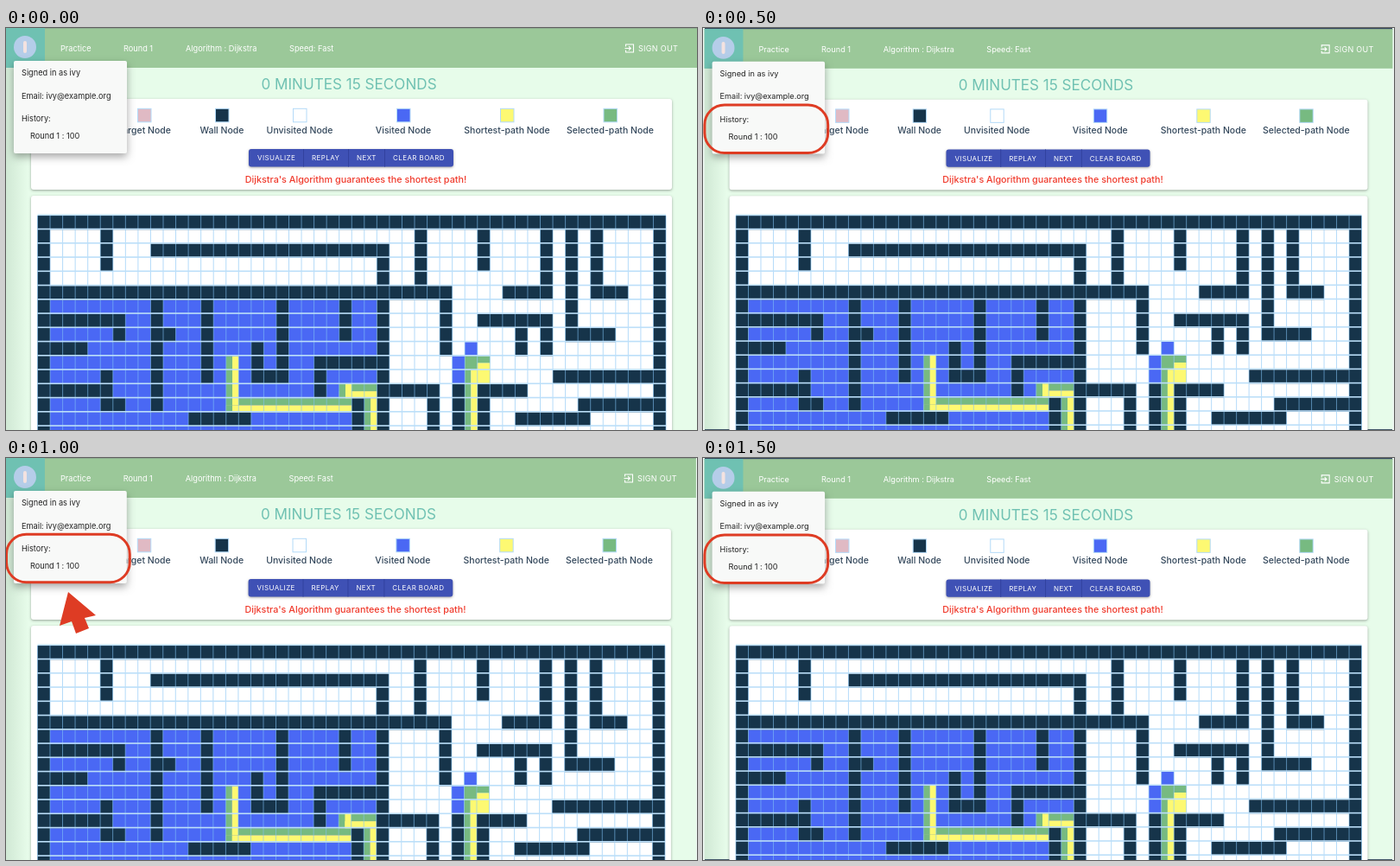
These frames come from a looping animation (800 by 465 pixels, 2000 ms). An HTML page with a canvas:

```html
<!DOCTYPE html>
<html lang="en">
<head>
<meta charset="utf-8">
<title>Pathfinding game history</title>
<style>
  html, body { margin: 0; width: 100%; height: 100%; overflow: hidden; background: #e7fcea; }
  canvas { display: block; width: 800px; height: 465px; }
</style>
</head>
<body>
<canvas id="stage" width="800" height="465"></canvas>
<script>
const ctx = document.getElementById('stage').getContext('2d');
const WALL = '#16344a', BLUE = '#4a68f4', YELLOW = '#fdf972', GREEN = '#77ba81',
      PINK = '#e0bac4', LINE = '#b3daf8', RED = '#de3c24', TEAL = '#6fc1b2';
const GRID = { x: 36.5, y: 217, w: 14.55, h: 16.25, cols: 50, rows: 16 };

// Centre lines of the walls, in cells; each wall is one cell thick
const WALLS = new Path2D(`M0 15V0H49V15 M0 5H32V9 M5 1V3 M30 1V4 M35 1V3 M40 1V5H37
  M42 1V8H45 M44 1V5H46 M9 2H27V15 M0 7H6V8 M0 9H3 M9 5V13 M9 8H10 M13 5V11 M19 5V11H17V9
  M24 5V8 M27 10H22V12 M0 12H5 M5 11V13H6 M25 13V15 M12 14H16 M35 7H40V9 M38 7V9
  M49 11H41 M49 13H43 M38 14H43 M27 12H31V15 M33 12V15 M38 12H35V15`);

function rect(x, y, w, h, color) {
  ctx.fillStyle = color;
  ctx.fillRect(x, y, w, h);
}

function panel(x, y, w, h, r, color, blur = 0, drop = 0) {
  ctx.save();
  if (blur) {
    ctx.shadowColor = 'rgba(0,0,0,.35)';
    ctx.shadowBlur = blur;
    ctx.shadowOffsetY = drop;
  }
  ctx.fillStyle = color;
  ctx.beginPath();
  ctx.roundRect(x, y, w, h, r);
  ctx.fill();
  ctx.restore();
}

function text(str, x, y, size, color, { weight = 400, align = 'left', spacing = 0 } = {}) {
  ctx.font = `${weight} ${size}px Inter, sans-serif`;
  ctx.letterSpacing = spacing + 'px';
  ctx.textAlign = align;
  ctx.fillStyle = color;
  ctx.fillText(str, x, y);
}

// Path pieces in cells: green on the left or top half, yellow on the other
function upright(col, row, rows) {
  rect(col, row, .5, rows, GREEN);
  rect(col + .5, row, .5, rows, YELLOW);
}

function level(col, row, cols) {
  rect(col, row, cols, .5, GREEN);
  rect(col, row + .5, cols, .5, YELLOW);
}

function drawCells() {
  rect(1, 6, 26, 10, BLUE);
  rect(34, 9, 1, 1, BLUE);
  rect(33, 10, 1, 2, BLUE);

  ctx.save();
  ctx.translate(.5, .5);
  ctx.strokeStyle = WALL;
  ctx.lineWidth = 1;
  ctx.lineCap = 'square';
  ctx.stroke(WALLS);
  ctx.restore();

  level(15, 13, 10);
  upright(15, 10, 3.5);
  rect(15, 13.5, .5, .5, GREEN);
  level(24, 12, 3);
  upright(24, 12, 1);
  upright(26, 13, 3);

  upright(34, 11, 5);
  rect(34, 10, 1, 1, GREEN);
  level(35, 10, 1);
  rect(35, 11, 1, 1, YELLOW);
}

function drawBoard() {
  const { x, y, w, h, cols, rows } = GRID;
  ctx.save();
  ctx.translate(x, y);
  ctx.save();
  ctx.scale(w, h);
  drawCells();
  ctx.restore();
  for (let c = 0; c <= cols; c++) rect(c * w - .5, 0, 1, rows * h, 'rgba(130,195,245,.6)');
  for (let r = 0; r <= rows; r++) rect(0, r * h - 1.5, cols * w, 1.6, '#bcdff9');
  ctx.restore();
}

function drawHeader() {
  rect(0, 0, 800, 46, '#9bc899');
  rect(0, 0, 800, 1, '#8fae90');
  rect(0, 0, 45, 46, TEAL);
  ctx.fillStyle = '#b5cde9';
  ctx.beginPath();
  ctx.arc(22, 22, 13, 0, 7);
  ctx.fill();
  panel(20, 15, 4, 14, 2, '#f3e2e0');

  [['Practice', 63], ['Round 1', 136], ['Algorithm : Dijkstra', 208], ['Speed: Fast', 328]]
    .forEach(([label, x]) => text(label, x, 27, 9.2, '#fff'));
  text('SIGN OUT', 732, 27, 9, '#fff', { spacing: .3 });
  ctx.strokeStyle = '#fff';
  ctx.lineWidth = 1.1;
  ctx.stroke(new Path2D('M717.5 21.5V19h9v9h-9v-2.5M716.5 23.5h6.5M721 21.2l2.3 2.3l-2.3 2.3'));
}

function drawLegend() {
  panel(29, 82, 742, 105, 3, '#fff', 3, 1);
  [['Target Node', 160, PINK], ['Wall Node', 250, WALL], ['Unvisited Node', 340, '#fff'],
   ['Visited Node', 460, BLUE], ['Shortest-path Node', 580, YELLOW],
   ['Selected-path Node', 699.5, GREEN]].forEach(([label, x, color]) => {
    rect(x - 7.5, 93.3, 15.5, 15.5, color);
    ctx.strokeStyle = LINE;
    ctx.lineWidth = 1;
    ctx.strokeRect(x - 7.5, 93.3, 15.5, 15.5);
    text(label, x, 122, 10.5, '#33475b', { weight: 500, align: 'center' });
  });

  panel(281, 140, 237, 20.5, 3, '#3f51b5', 3, 1);
  [['VISUALIZE', 291], ['REPLAY', 354], ['NEXT', 406], ['CLEAR BOARD', 448]]
    .forEach(([label, x], i) => {
      if (i) rect(x - 10, 140, 1, 20.5, '#32429f');
      text(label, x, 153.2, 8, '#fff', { spacing: .4 });
    });
  text("Dijkstra's Algorithm guarantees the shortest path!", 405, 179, 10.8, '#f03a2c',
    { weight: 500, align: 'center' });
}

function drawMenu() {
  panel(9, 38, 131, 107, 2, '#f8f9f8', 10, 4);
  [['Signed in as ivy', 18, 55], ['Email: ivy@example.org', 18, 81.5], ['History:', 18, 108.3],
   ['Round 1 : 100', 28, 128.3]].forEach(([label, x, y]) => text(label, x, y, 9.2, '#222'));
}

function drawPage() {
  rect(0, 0, 800, 465, '#e7fcea');
  const shade = ctx.createLinearGradient(0, 0, 26, 0);
  shade.addColorStop(0, 'rgba(90,130,100,.16)');
  shade.addColorStop(1, 'rgba(90,130,100,0)');
  rect(0, 46, 26, 419, shade);
  text('0 MINUTES 15 SECONDS', 397, 71, 17.1, TEAL, { align: 'center' });
  drawLegend();
  panel(29, 194, 742, 290, 3, '#fff', 3, 1);
  drawBoard();
  drawHeader();
  drawMenu();
}

function drawRing(x, y) {
  ctx.strokeStyle = RED;
  ctx.lineWidth = 3;
  ctx.beginPath();
  ctx.roundRect(x, y, 142.8, 55.5, 23);
  ctx.stroke();
}

function drawArrow() {
  ctx.fillStyle = RED;
  ctx.fill(new Path2D('M72 155L104 182L91 185L96 197L81 203L76 189L62 194Z'));
}

function draw() {
  const step = Math.floor(performance.now() % 2000 / 500);
  const inset = step % 2 === 1;
  ctx.setTransform(1, 0, 0, 1, 0, 0);
  rect(0, 0, 800, 465, '#eef8f2');
  if (inset) {
    rect(2, 0, 796, 465, '#33475e');
    ctx.setTransform(.9959, 0, 0, .9959, 1.65, 1);
  } else if (step === 2) {
    ctx.setTransform(.9986, 0, 0, 1, 0, 0);
  }
  drawPage();
  ctx.setTransform(1, 0, 0, 1, 0, 0);
  if (inset) drawRing(1.9, 89);
  if (step === 2) {
    drawRing(.5, 88.2);
    drawArrow();
  }
  requestAnimationFrame(draw);
}
draw();
</script>
</body>
</html>
```
